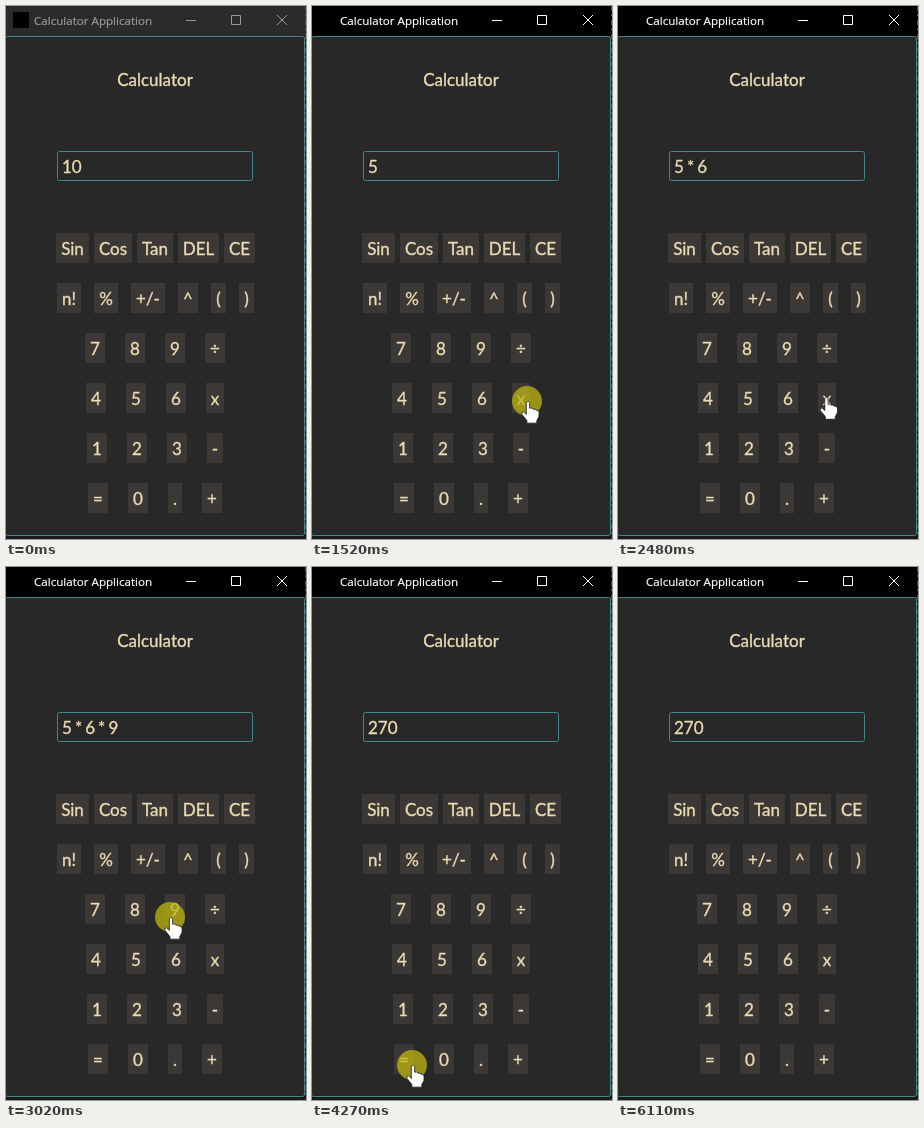
Recreate the animation shown at these times as an HTML page. Size 300 px wide and 533 px high, loop 6.26 s.

```html
<!DOCTYPE html>
<html lang="en">
<head>
<meta charset="utf-8">
<title>Calculator</title>
<style>
  html, body { margin: 0; width: 100%; height: 100%; overflow: hidden; background: #000; }
  svg { display: block; }
  text { font: 17px Lato, sans-serif; fill: #ebdbb2; stroke: #ebdbb2; stroke-width: .35; white-space: pre; }
  #display { word-spacing: -1.3px; }
  #bar { --ink: #999; --back: #2b2b2b; }
  #bar.active { --ink: #fff; --back: #000; }
  #bar text { font: 11.6px "Open Sans", sans-serif; fill: var(--ink); stroke: var(--ink); stroke-width: .2; }
  #bar path { fill: none; stroke: var(--ink); }
  #back { fill: var(--back); }
  .line { fill: #282828; stroke: #458588; }
  .key { fill: #3c3836; }
  #keys text { text-anchor: middle; }
  #cursor path { fill: #fff; stroke: #111; stroke-width: .7; }
</style>
</head>
<body>
<svg width="300" height="533" viewBox="0 0 300 533">
  <rect width="300" height="533" fill="#161a1a"/>
  <g id="bar">
    <rect id="back" width="300" height="30"/>
    <rect x="7" y="6" width="16" height="16"/>
    <text x="28" y="19">Calculator Application</text>
    <path d="M180 14.5h10M225.5 9.5h9v9h-9zM271 9l10 10M281 9l-10 10"/>
  </g>
  <path d="M299.5 0V533" stroke="#2f5a50" stroke-dasharray="5 3 2 4"/>
  <rect class="line" x="-.5" y="30.5" width="299" height="499" rx="2"/>
  <text x="149" y="79.7" text-anchor="middle">Calculator</text>
  <rect class="line" x="51.5" y="145.5" width="195" height="29" rx="2"/>
  <text id="display" x="56" y="166.7"></text>
  <g id="keys"></g>
  <circle id="press" r="15" fill="#bdb610" fill-opacity=".75"/>
  <g id="cursor">
    <path id="arrow" d="M.3.5V16L3.7 12.6 6.2 18.5 8.6 17.4 6.1 11.7H11.5Z"/>
    <path id="hand" transform="translate(1) scale(1.1 1.03)" d="M-1.5 1.5Q0-1 1.5 1.5V7Q4 6 4.5 8 7 7 7.3 9 10 8.3 10 11V15L8 19V21.5H-1V19L-5.5 13Q-6 10-4 10.5L-1.5 13Z"/>
  </g>
</svg>
<script>
const LOOP = 6260, ENTER = 260, ACTIVATE = 890, LEAVE = 6110, REPLY = 140;
const $ = id => document.getElementById(id);

function add(parent, name, attributes, content = '') {
  const node = document.createElementNS('http://www.w3.org/2000/svg', name);
  for (const key in attributes) node.setAttribute(key, attributes[key]);
  node.textContent = content;
  return parent.appendChild(node);
}

// Keys are as wide as their label plus padding; every row is centred
const rows = ['Sin Cos Tan DEL CE', 'n! % +/- ^ ( )', '7 8 9 ÷', '4 5 6 x', '1 2 3 -', '= 0 . +'];
const keys = rows.flatMap((labels, row) => {
  const gap = [5, 13][row] ?? 20, y = 227 + 50 * row;
  const line = labels.split(' ').map(label => {
    const box = add($('keys'), 'rect', { class: 'key', y, height: 30 });
    const text = add($('keys'), 'text', { y: y + 21.7 }, label);
    return { box, text, y, w: Math.round(text.getComputedTextLength()) + 10 };
  });
  let x = Math.round(149 - line.reduce((sum, key) => sum + key.w + gap, -gap) / 2);
  for (const key of line) {
    key.x = x;
    key.box.setAttribute('x', x);
    key.box.setAttribute('width', key.w);
    key.text.setAttribute('x', x + key.w / 2);
    x += key.w + gap;
  }
  return line;
});

// Pointer stops: arrival, pause, x, y and the key held down during the pause
const stops = [
  [ENTER, 0, 191, 498],
  [500, 0, 110, 450],
  [ACTIVATE, 270, 131, 399, '5'],
  [1500, 290, 215, 395, 'x'],
  [1990, 240, 169, 399, '6'],
  [2500, 180, 208, 391, 'x'],
  [2820, 360, 164, 350, '9'],
  [3450, 0, 101, 491],
  [3700, 0, 168, 486],
  [4130, 390, 100, 498, '='],
  [4590, 200, 109, 478],
  [5000, 0, 239, 222],
  [5210, 150, 269, 87],
  [5700, 0, 241, 300],
  [6040, LEAVE, 263, 520]
].map(([at, pause, x, y, key]) => ({ at, until: at + pause, x, y, key }));

function pointerAt(t) {
  const i = stops.findLastIndex(stop => stop.at <= t);
  const from = stops[i], to = stops[i + 1];
  if (t <= from.until) return from;
  const u = (t - from.until) / (to.at - from.until), ease = u * u * (3 - 2 * u);
  return { x: from.x + (to.x - from.x) * ease, y: from.y + (to.y - from.y) * ease };
}

function readingAt(t) {
  const typed = stops.filter(stop => stop.key && stop.at + REPLY <= t).map(stop => stop.key);
  if (!typed.length) return '10';
  if (typed.at(-1) !== '=') return typed.join(' ').replaceAll('x', '*');
  return String(typed.filter(key => key > 0).reduce((product, n) => product * n, 1));
}

const show = (id, on) => $(id).setAttribute('visibility', on ? 'visible' : 'hidden');

function draw() {
  const t = performance.now() % LOOP;
  const inside = t >= ENTER && t < LEAVE;
  const { x, y, key } = inside ? pointerAt(t) : stops[0];
  const overKey = keys.some(k => x >= k.x - 1 && x <= k.x + k.w + 1 && y >= k.y - 6 && y <= k.y + 30);
  $('bar').classList.toggle('active', t >= ACTIVATE);
  $('display').textContent = readingAt(t);
  show('press', inside && key);
  show('arrow', inside && !overKey);
  show('hand', inside && overKey);
  for (const id of ['press', 'cursor']) $(id).setAttribute('transform', `translate(${x} ${y})`);
  requestAnimationFrame(draw);
}
draw();
</script>
</body>
</html>
```
